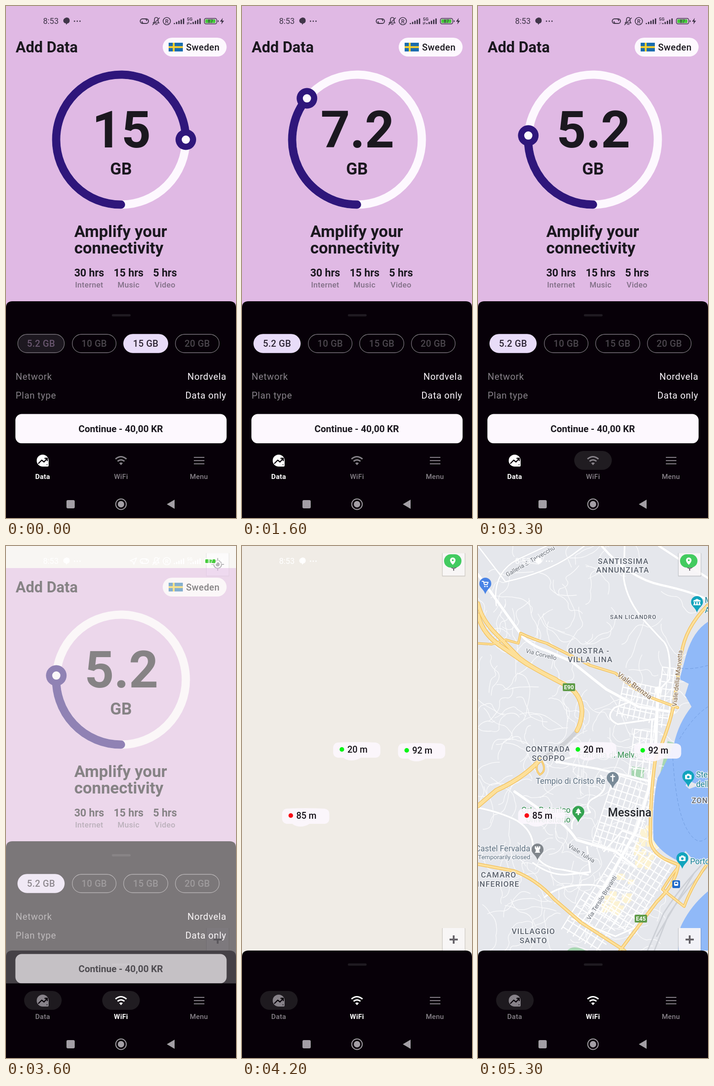
These frames come from a looping animation (502 px wide and 1115 px high, 5.4 s). An HTML page:

```html
<!DOCTYPE html>
<html lang="en">
<head>
<meta charset="utf-8">
<title>Add Data</title>
<style>
  html, body { margin: 0; width: 100%; height: 100%; overflow: hidden; background: #fff; }
  svg { display: block; width: 100%; height: 100%; font-family: Roboto, sans-serif; }
  .line { fill: none; stroke-linecap: round; stroke-linejoin: round; }
  .labels text { paint-order: stroke; stroke: #f4f5f8; stroke-width: 3px; stroke-linejoin: round; }
</style>
</head>
<body>
<svg id="stage" viewBox="0 0 502 1115" preserveAspectRatio="none"></svg>
<script>
const LOOP = 5400, STEP = 100;
const INK = '#1b181f', INDIGO = '#2f167b', BLACK = '#070008', LILAC = '#e0b9e4', PAPER = '#fdf8fe';
const GREY = '#878289';

const text = (x, y, str, size, weight, fill, anchor = 'start', extra = '') =>
  `<text x="${x}" y="${y}" font-size="${size}" font-weight="${weight}" fill="${fill}" text-anchor="${anchor}" ${extra}>${str}</text>`;
const rect = (x, y, w, h, r, fill, extra = '') =>
  `<rect x="${x}" y="${y}" width="${w}" height="${h}" rx="${r}" fill="${fill}" ${extra}/>`;
const circle = (x, y, r, fill, extra = '') => `<circle cx="${x}" cy="${y}" r="${r}" fill="${fill}" ${extra}/>`;
const line = (d, color, width, extra = '') =>
  `<path class="line" d="${d}" stroke="${color}" stroke-width="${width}" ${extra}/>`;
const sheet = y => `<path d="M0 1115V${y + 14}q0-14 14-14H488q14 0 14 14V1115z" fill="${BLACK}"/>`
  + rect(231, y + 28, 41, 5, 2.5, '#1f1a21');

// ---- data screen ----
const CHIPS = [[25, 103, '5.2 GB'], [144, 97, '10 GB'], [256, 98, '15 GB'], [369, 97, '20 GB']];

function dataScreen() {
  const chips = CHIPS.map(([x, w, label], i) => `<g id="chip${i}">`
    + rect(x + .7, 715, w - 1.4, 40, 20, 'none', 'stroke-width="1.3"')
    + text(x + w / 2, 742, label, 20, 500, GREY, 'middle', 'letter-spacing=".3"') + '</g>').join('');
  const perk = (x, hours, kind) => text(x, 589, hours + ' hrs', 23, 700, INK, 'middle')
    + text(x, 613, kind, 17, 500, '#806f86', 'middle', 'letter-spacing=".3"');
  const row = (y, key, value) => text(21, y, key, 20, 400, GREY, 'start', 'letter-spacing=".7"')
    + text(481, y, value, 20, 400, PAPER, 'end', 'letter-spacing=".7"');
  return rect(0, 48, 502, 620, 0, LILAC)
    + text(21, 101, 'Add Data', 33, 700, INK)
    + rect(342, 69, 139.5, 41, 20.5, PAPER)
    + rect(355, 80, 31, 19, 0, '#1a6cae') + rect(364, 80, 4, 19, 0, '#fbd02d') + rect(355, 87.5, 31, 4, 0, '#fbd02d')
    + text(393, 97, 'Sweden', 20, 500, INK, 'start', 'letter-spacing=".4"')
    + circle(251, 291, 141.5, 'none', `stroke="${PAPER}" stroke-width="18"`)
    + `<path id="arc" class="line" stroke="${INDIGO}" stroke-width="18"/>`
    + `<g id="knob">${circle(0, 0, 22.5, INDIGO)}${circle(0, 0, 9, PAPER)}</g>`
    + text(252, 308, '', 112, 700, INK, 'middle', 'id="amount"')
    + text(251, 367, 'GB', 36, 700, INK, 'middle')
    + text(149, 503, 'Amplify your', 35.5, 700, INK) + text(149, 539, 'connectivity', 35.5, 700, INK)
    + perk(181.5, 30, 'Internet') + perk(267.5, 15, 'Music') + perk(347, 5, 'Video')
    + sheet(643) + chips
    + row(814, 'Network', 'Nordvela') + row(855, 'Plan type', 'Data only')
    + rect(20.5, 888.5, 461, 64, 14, PAPER, 'id="button"')
    + text(250.5, 928, 'Continue - 40,00 KR', 20.5, 700, INK, 'middle');
}

// ---- map ----
const WATER = '#90b9f8', TEAL = '#12a4bd', SLATE = '#5d7080';
const YELLOW_ROADS = [
  ['M502 128Q452 178 444 235L428 340Q420 390 387 465Q376 540 376 640Q378 665 408 682L437 694', 6],
  ['M437 694Q432 735 390 775L310 881', 6],
  ['M436 700Q420 720 403 748L450 785Q466 740 502 690', 5],
  ['M93 190Q120 203 150 212L245 260L300 277Q350 320 385 333L436 352', 5],
  ['M0 693L80 708Q130 728 165 768L225 820L320 881', 6],
  ['M93 190L88 212L60 204L30 214L0 212', 4],
  ['M0 125Q8 160 38 190L90 243Q125 270 170 290', 8],
  ['M0 150Q10 192 50 218L105 256Q150 282 186 300Q225 318 227 360Q226 385 216 402', 9],
  ['M135 466Q100 505 40 532L0 566', 9],
  ['M135 466q-14 18 0 32q16-8 4-30', 3]
];
const WHITE_ROADS = [
  ['M0 62Q35 110 92 190Q110 215 150 228L205 252Q245 285 280 312L350 350L428 362', 6],
  ['M0 0L60 78Q150 58 205 20L232 0', 3], ['M40 130Q30 60 85 30L150 0', 3],
  ['M395 0L502 70M270 0Q330 70 400 85T502 118', 5],
  ['M320 0L318 70Q325 120 365 165L402 205Q422 220 418 290L393 316', 4],
  ['M393 312L386 470Q372 540 345 620L300 700L240 805', 7],
  ['M398 290L384 405M380 380L372 520', 4],
  ['M390 376L305 388Q275 375 298 352L330 340', 4],
  ['M130 440Q170 425 170 470L260 485L382 514', 5],
  ['M172 472Q230 445 280 452T385 462', 4],
  ['M268 500Q290 530 255 548Q230 560 245 580Q200 585 205 615', 4],
  ['M80 535L130 570Q190 600 215 640L300 665L345 700', 6],
  ['M0 570Q50 580 85 598Q120 620 120 655Q128 700 185 705L240 716', 4],
  ['M120 690Q160 720 200 715L245 710L238 655', 4],
  ['M145 765Q180 735 250 738L330 752', 4],
  ['M275 665L315 620L372 640M205 812L300 850L345 830', 4]
];
const GRIDS = [[352, 340, 84, 78, 12, 12], [360, 452, 50, 100, 8, 14], [318, 590, 95, 165, 18, 13],
  [328, 740, 120, 175, 32, 13], [250, 820, 100, 95, 32, 15], [410, 330, 30, 130, 7, 13]];

function seeded(seed) {
  return () => (seed = (seed * 16807) % 2147483647) / 2147483647;
}

function lanes() {
  const rnd = seeded(77);
  let d = '';
  for (let i = 0; i < 190; i++) {
    d += `M${(rnd() * 400).toFixed()} ${(rnd() * 880).toFixed()}`;
    let a = rnd() * 6.3;
    for (let k = 0; k < 4; k++) {
      const b = a + rnd() * 2 - 1, s = 6 + rnd() * 12;
      d += `q${(s * Math.cos(a)).toFixed()} ${(s * Math.sin(a)).toFixed()} ${(2 * s * Math.cos(b)).toFixed()} ${(2 * s * Math.sin(b)).toFixed()}`;
      a = b;
    }
  }
  return line(d, '#fff', 1.3, 'opacity=".85"');
}

function streetGrid([cx, cy, w, h, turn, gap]) {
  let d = '';
  for (let x = -w / 2; x <= w / 2; x += gap) d += `M${x} ${-h / 2}V${h / 2}`;
  for (let y = -h / 2; y <= h / 2; y += gap * 1.2) d += `M${-w / 2} ${y}H${w / 2}`;
  return line(d, '#fff', 2.4, `transform="translate(${cx} ${cy}) rotate(${turn})"`);
}

function blocks() {
  const rnd = seeded(12);
  let out = '';
  for (let i = 0; i < 34; i++) {
    const v = rnd();
    out += rect(375 - v * 85 + (rnd() - .5) * 50, 605 + v * 185, 9 + rnd() * 10, 9 + rnd() * 12, 0, '#fcf3d3', 'transform="rotate(3 330 700)"');
  }
  return out;
}

const GLYPHS = {
  cross: line('M0-7V7M-4-3H4', '#fff', 2.6),
  tree: '<path d="M0-8l5 6h-2l4 5h-5.500v4h-3v-4h-5.500l4-5h-2z" fill="#fff"/>',
  camera: rect(-7, -4, 14, 10, 2, '#fff') + rect(-3, -6, 6, 4, 1, '#fff') + circle(0, 1, 2.8, TEAL),
  museum: '<path d="M0-7l8 4v2H-8v-2zM-7 0h3v5h-3zM-1.500 0h3v5h-3zM4 0h3v5H4zM-8 5H8v2H-8z" fill="#fff"/>',
  tower: '<path d="M-6-7h3v3h1.500v-3h3v3H3v-3h3v5l-2 2v4l2 3H-6l2-3v-4l-2-2z" fill="#fff"/>',
  cart: line('M-7-5h3l2 7H4L6-3H-3', '#fff', 2) + circle(-1, 6, 1.6, '#fff') + circle(4, 6, 1.6, '#fff')
};
const pin = (x, y, color, glyph) => `<g transform="translate(${x} ${y})">`
  + `<path d="M-13 0a13 13 0 0 1 26 0c0 9-9 11-13 23c-4-12-13-14-13-23z" fill="${color}"/>${GLYPHS[glyph]}</g>`;
const shield = (x, y, str) => rect(x, y, 27, 17, 2, '#5e9b47')
  + `<text x="${x + 13.5}" y="${y + 13}" font-size="12.500" font-weight="700" fill="#fff" text-anchor="middle">${str}</text>`;

function mapLabels() {
  const area = (x, y, str, size = 17) => text(x, y, str, size, 500, '#5b626d', 'middle', 'letter-spacing="1.1"');
  const street = (x, y, turn, str, size, fill = '#686e76') =>
    text(0, 0, str, size, 400, fill, 'middle', `dy=".35em" transform="translate(${x} ${y}) rotate(${turn})"`);
  const place = (x, y, str, fill, anchor, size = 17.5) => text(x, y, str, size, 400, fill, anchor);
  return '<g class="labels">'
    + area(317, 39, 'SANTISSIMA') + area(316, 58, 'ANNUNZIATA') + area(339, 159, 'SAN LICANDRO', 12.5)
    + area(242, 234, 'GIOSTRA -') + area(245, 253, 'VILLA LINA')
    + area(153, 448, 'CONTRADA') + area(154, 468, 'SCOPPO')
    + area(45, 722, 'CAMARO') + area(44, 742, 'INFERIORE')
    + area(121, 845, 'VILLAGGIO') + area(121, 865, 'SANTO') + area(490, 560, 'ZONA', 16)
    + street(114, 33, -30, 'Galleria S. Tarvecchu', 13) + street(138, 236, 14, 'Via Corvello', 13)
    + street(342, 304, 36, 'Viale Brenzia', 15.5, '#80603a') + street(435, 288, -84, 'Viale della Marvetta', 14, '#80603a')
    + street(226, 669, 32, 'Viale Tulvia', 13) + street(270, 766, -58, 'Via Tersilo Bravanti', 13)
    + place(218, 461, 'Fontana di Melvasto', '#2e8c4a') + place(126, 518, 'Tempio di Cristo Re', SLATE)
    + place(202, 581, 'Orto Botanico', '#2e8c4a', 'end') + place(202, 602, 'Universitario', '#2e8c4a', 'end')
    + place(114, 665, 'Castel Fervalda', SLATE, 'end') + place(114, 682, 'Temporarily closed', SLATE, 'end', 13.5)
    + place(495, 124, 'Mu', '#147f94') + place(495, 146, 'Ac', '#147f94')
    + place(476, 504, 'Stel', '#147f94') + place(476, 525, 'della', '#147f94') + place(463, 693, 'Porto', '#147f94')
    + text(331, 589, 'Messina', 25, 500, '#24272c', 'middle') + '</g>';
}

function cityMap() {
  const roads = (list, color, extra, alpha = 1) => list.map(([d, w]) => line(d, color, w + extra, `opacity="${alpha}"`)).join('');
  return rect(0, 0, 502, 900, 0, '#e5e7ec')
    + '<path d="M414 425l14 4-6 40-16 40-12 2z M335 480l28 4-2 24-26-4z M195 881q12-14 40 0z" fill="#a8d7b2"/>'
    + blocks() + lanes() + GRIDS.map(streetGrid).join('')
    + `<path d="M502 165Q470 185 455 235L440 290L460 300L452 325L466 350Q438 385 428 430Q412 470 392 505Q380 560 383 640Q398 667 437 686L453 664L475 690L502 680z M502 752Q462 785 442 830L437 881H502z" fill="${WATER}"/>`
    + '<path d="M453 522q6-14 16-7l14 6-22 8z" fill="#e5e7ec"/>'
    + line('M502 260Q465 270 443 266M424 440Q430 570 455 615T502 632M440 420Q470 370 502 350', '#6f9be0', 1, 'stroke-dasharray="6 5"')
    + line('M492 690Q440 745 405 800L370 881M500 700Q450 750 415 805L385 881M470 715L390 850', '#cdd0d6', 3)
    + line('M216 402Q190 435 135 466', '#d0d2d6', 9)
    + roads(WHITE_ROADS, '#d5d9e0', 1.2, .6) + roads(WHITE_ROADS, '#fff', 0)
    + roads(YELLOW_ROADS, '#f2bd53', 1) + roads(YELLOW_ROADS, '#fde09a', -1.5)
    + circle(393, 314, 8, '#fff') + mapLabels()
    + shield(185, 299, 'E90') + shield(342, 803, 'E45')
    + rect(424, 728, 17, 17, 3, '#1f69c9') + rect(428, 731, 9, 9, 2, '#fff') + rect(430, 733, 5, 3, 0, '#1f69c9')
    + pin(16, 82, '#4a84e6', 'cart') + pin(478, 122, TEAL, 'museum') + pin(294, 505, '#7a8b98', 'cross')
    + pin(219, 579, '#35a351', 'tree') + pin(459, 502, TEAL, 'camera') + pin(446, 680, TEAL, 'camera')
    + pin(130, 661, '#80868c', 'tower');
}

function wifiScreen() {
  const marker = (x, y, label, color) => `<g transform="translate(${x} ${y})">`
    + `<path d="M10 0Q52-2 93 0Q103 2 103 11V23Q102 32 93 33H60Q50 39 40 39T22 33H10Q1 31 0 23V11Q1 1 10 0z" fill="${PAPER}" fill-opacity=".9"/>`
    + circle(19, 15, 5, color) + text(31, 22, label, 19.5, 500, '#151218') + '</g>';
  const tool = y => rect(436.5, y, 51, 51, 1, '#000', 'opacity=".12"') + rect(438, y, 48, 49, 1, '#fbf9fa', 'opacity=".93"');
  return rect(0, 0, 502, 900, 0, '#f0ece6')
    + `<g id="map">${cityMap()}</g>`
    + tool(15.5) + circle(462, 40, 8.5, 'none', 'stroke="#67646a" stroke-width="2.2"') + circle(462, 40, 4.5, '#67646a')
    + line('M462 27v4M462 49v4M449 40h4M471 40h4', '#67646a', 2.2)
    + tool(832) + line('M462 848V866M453 857H471', '#67646a', 4, 'style="stroke-linecap:butt"')
    + `<g id="markers">${marker(199, 428, '20 m', '#00f514')}${marker(340.5, 430, '92 m', '#00f514')}${marker(87.5, 572, '85 m', '#f90a14')}</g>`
    + sheet(881);
}

// ---- system bars and tabs ----
function tabs() {
  const icons = [
    `<path d="M80 977a13 13 0 0 1 13 13v11q0 2-2 2h-11a13 13 0 0 1 0-26z" fill="currentColor"/>`
      + line('M71 996l7-7 5 4 7-8M85 985h5v5', BLACK, 2.4) + circle(89.500, 999, 1, BLACK),
    line('M239 986.500Q251 976.500 263 986.500M243.500 991.500Q251 985.500 258.500 991.500', 'currentColor', 3, 'style="stroke-linecap:butt"')
      + '<path d="M247 995.500q4-3 8 0l-4 4.500z" fill="currentColor"/>',
    line('M410 983H433M410 990H433M410 997H433', 'currentColor', 2.2, 'style="stroke-linecap:butt"')
  ];
  return rect(0, 952.5, 502, 163, 0, BLACK)
    + rect(39.5, 969, 82, 41, 20.5, '#1e1a1f', 'id="dataPill"') + rect(210, 969, 82, 41, 20.5, '#201c21', 'id="wifiPill"')
    + ['Data', 'WiFi', 'Menu'].map((name, i) => `<g id="tab${i}">${icons[i]}`
      + text([80, 251, 421][i], 1030, name, 15.2, 500, 'currentColor', 'middle', 'letter-spacing=".3"') + '</g>').join('')
    + rect(132, 1076, 18, 18, 3, '#a39fa5') + circle(251, 1085, 11.5, 'none', 'stroke="#a39fa5" stroke-width="2"')
    + circle(251, 1085, 7, '#a39fa5') + '<path d="M351 1085L368 1075V1095z" fill="#a39fa5"/>';
}

function statusBar() {
  const bars = x => [0, 1, 2, 3, 4].map(i => rect(x + i * 5, 37 - i * 2.5, 3, 2.5 + i * 2.5, 1, 'currentColor')).join('');
  const stroke = (d, w = 2) => line(d, 'currentColor', w);
  return '<g id="status">' + text(81, 39, '8:53', 17.5, 400, 'currentColor')
    + '<path d="M132 25q7 0 7 7 0 5-5 6l-3 3v-3q-6-1-6-6t7-7z" fill="currentColor"/>'
    + [149.5, 155.5, 161.5].map(x => circle(x, 33, 1.5, 'currentColor')).join('')
    + '<g id="icons">' + `<g id="arrow">${stroke('M271 32L285 26L279 40L277 34z', 1.700)}</g>`
    + stroke('M303 38h-5a5 5 0 0 1 0-10h5q4 0 4 4M301 28h5a5 5 0 0 1 0 10h-5q-4 0-4-4')
    + stroke('M321 37h13l-2-3v-4q0-5-4-5t-4 5v4zM326 40h4M335 26L320 41', 1.7)
    + circle(351, 33, 8, 'none', 'stroke="currentColor" stroke-width="1.700"')
    + text(351, 37.5, 'R', 12, 500, 'currentColor', 'middle')
    + bars(366) + bars(402) + text(395, 32, '5G', 9.5, 700, 'currentColor')
    + `<g id="traffic">${stroke('M396 40v-4M399 35v4', 1.5)}</g>`
    + rect(433, 27, 27, 12, 3.5, 'none', 'stroke="currentColor" stroke-width="1.500"') + rect(462, 31, 2, 4, 1, 'currentColor')
    + rect(435, 29, 22, 8, 1.5, '#45cc3b') + text(446, 36.5, '87', 10, 500, 'currentColor', 'middle')
    + '<path d="M473 26l-6 8h4l-1 6 6-8h-4z" fill="currentColor"/></g></g>'
    + `<g id="chip">${rect(441, 18, 38, 29, 14.5, '#42cb60')}<path d="M454 31a6 6 0 0 1 12 0q0 4-6 10q-6-6-6-10z" fill="#fff"/>${circle(460, 31, 2, '#42cb60')}</g>`;
}

const stage = document.getElementById('stage');
stage.innerHTML = `<g id="wifi">${wifiScreen()}</g>` + rect(0, 0, 502, 49, 0, LILAC, 'id="strip"')
  + `<g id="data">${dataScreen()}</g>` + tabs() + statusBar();

// ---- motion ----
const el = id => document.getElementById(id);
const set = (id, attrs) => Object.entries(attrs).forEach(([k, v]) => el(id).setAttribute(k, v));
const clamp = v => Math.min(1, Math.max(0, v));
const progress = (t, start, length) => clamp((t - start) / length);

// cubic-bezier(.4, 0, .2, 1)
function ease(x) {
  let lo = 0, hi = 1;
  for (let i = 0; i < 24; i++) {
    const s = (lo + hi) / 2, r = 1 - s;
    if (1.2 * r * r * s + .6 * r * s * s + s * s * s < x) lo = s; else hi = s;
  }
  return lo * lo * (3 - 2 * lo);
}

function drawDial(gb) {
  const a = gb / 20 * 2 * Math.PI;
  const x = 251 - 141.5 * Math.sin(a), y = 291 + 141.5 * Math.cos(a);
  set('arc', { d: `M251 432.500A141.500 141.500 0 ${a > Math.PI ? 1 : 0} 1 ${x} ${y}` });
  set('knob', { transform: `translate(${x} ${y})` });
  el('amount').textContent = Math.round(gb * 10) / 10;
}

function drawChips(t) {
  const selected = t < 500 ? 2 : 0;
  CHIPS.forEach((_, i) => {
    const [box, label] = el('chip' + i).children, on = i === selected, pressed = i === 0 && t < 500;
    box.setAttribute('fill', on ? '#e8dcf8' : pressed ? '#1d1820' : 'none');
    box.setAttribute('stroke', on ? '#e8dcf8' : '#7b767d');
    label.setAttribute('fill', on ? '#2c2433' : pressed ? '#69566f' : '#4b464d');
  });
}

function render(t) {
  const switched = t >= 3400, fade = progress(t, 3360, 700);
  drawDial(15 - 9.8 * ease(progress(t, 565, 2000)));
  drawChips(t);
  set('button', { fill: t >= 2100 && t < 2500 ? '#ebe5e9' : PAPER });

  set('data', { opacity: 1 - ease(fade) });
  set('wifi', { opacity: switched ? clamp(ease(fade) * .93 + fade * .07) : 0 });
  set('strip', { opacity: switched ? 0 : 1 });
  set('markers', { opacity: t >= 4000 ? 1 : 0 });
  set('map', { opacity: t < 5100 ? 0 : .4 + .6 * progress(t, 5100, 200) });

  set('wifiPill', { opacity: progress(t, 2700, 300) * (1 - progress(t, 3700, 300)) });
  set('dataPill', { opacity: switched ? 1 : 0 });
  [!switched, switched, false].forEach((on, i) => set('tab' + i, {
    color: on ? '#fff' : GREY, 'font-weight': on ? 700 : 500
  }));
  for (const i of [0, 1, 2]) el('tab' + i).querySelector('text').setAttribute('font-weight', i === (switched ? 1 : 0) ? 700 : 500);

  set('status', { color: switched ? '#fff' : '#41364a' });
  set('arrow', { opacity: switched ? 1 : 0 });
  set('traffic', { opacity: t >= 1700 ? .35 : 1 });
  set('icons', { opacity: 1 - progress(t, 3800, 300) });
  set('chip', { opacity: progress(t, 3900, 200) });
}

const begin = performance.now();
function tick() {
  const t = (performance.now() - begin) % LOOP;
  render(Math.floor(t / STEP) * STEP);
  requestAnimationFrame(tick);
}
tick();
</script>
</body>
</html>
```
